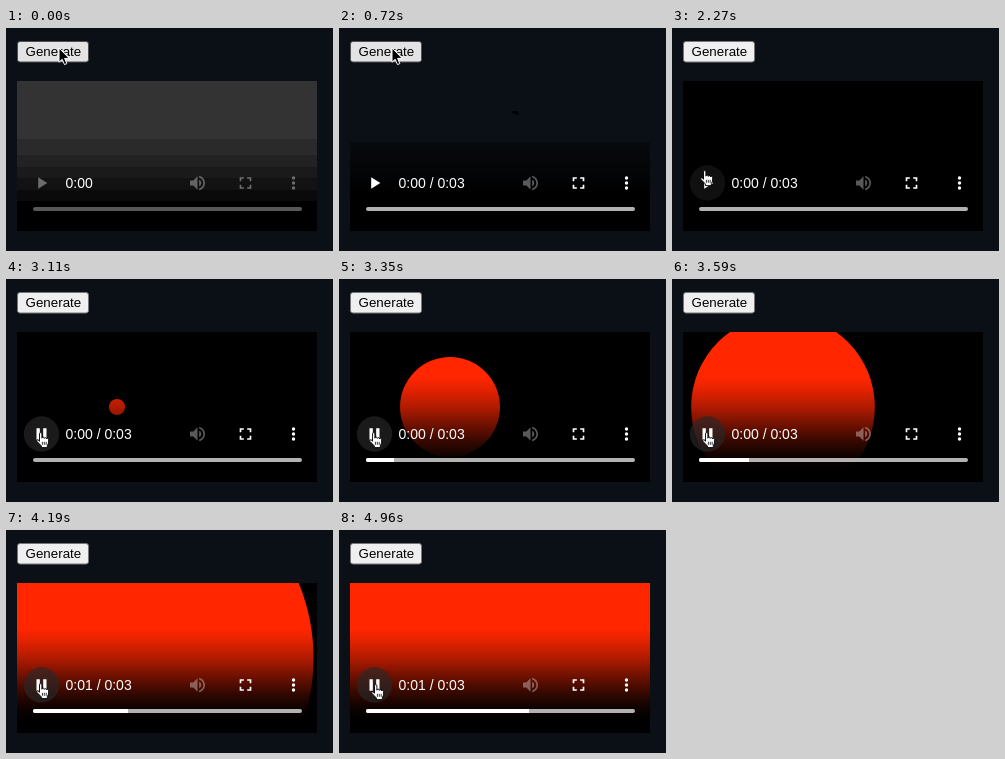
Animation of 327 by 223 pixels, one loop 4.98 s. Source, as an HTML page:

```html
<!DOCTYPE html>
<html lang="en">
<head>
<meta charset="utf-8">
<title>Generate video</title>
<style>
  html, body { margin: 0; width: 100%; height: 100%; overflow: hidden; background: #0b0f16; }
  svg { display: block; width: 327px; height: 223px; font-family: "Liberation Sans", Arial, sans-serif; }

  /* every part shares one clock and changes in hard steps */
  .a { animation: 4.98s step-end infinite; }

  .face { animation-name: face; }
  @keyframes face {
    0% { fill: #e3e3e3; stroke: #4f4f4f; }
    2.409% { fill: #f5f5f5; stroke: #8d8d8d; }
    7.228% { fill: #e3e3e3; stroke: #4f4f4f; }
    34.939%, 100% { fill: #efefef; stroke: #767676; }
  }

  .empty { animation-name: empty; }
  @keyframes empty { 0% { visibility: visible; } 14.457%, 100% { visibility: hidden; } }
  .loading { animation-name: loading; }
  @keyframes loading { 0%, 15.662%, 100% { visibility: hidden; } 14.457% { visibility: visible; } }
  .video { animation-name: video; }
  @keyframes video { 0% { visibility: hidden; } 15.662%, 100% { visibility: visible; } }
  .ready { animation-name: ready; }
  @keyframes ready { 0% { visibility: hidden; } 14.457%, 100% { visibility: visible; } }

  .ball { animation-name: grow; }
  @keyframes grow {
    0% { r: 0px; }
    62.449% { r: 8.1px; animation-timing-function: steps(20); }
    86.546%, 100% { r: 217.5px; }
  }

  .play { animation-name: play; }
  @keyframes play {
    0% { visibility: visible; fill-opacity: .38; }
    14.457% { visibility: visible; fill-opacity: 1; }
    62.449%, 100% { visibility: hidden; fill-opacity: 1; }
  }
  .pause { animation-name: pause; }
  @keyframes pause { 0% { visibility: hidden; } 62.449%, 100% { visibility: visible; } }
  .tools { animation-name: tools; }
  @keyframes tools { 0% { fill-opacity: .38; } 14.457%, 100% { fill-opacity: 1; } }

  .sec0 { animation-name: sec0; }
  @keyframes sec0 { 0%, 82.931%, 100% { visibility: hidden; } 14.457% { visibility: visible; } }
  .sec1 { animation-name: sec1; }
  @keyframes sec1 { 0% { visibility: hidden; } 82.931%, 100% { visibility: visible; } }

  .track { animation-name: track; }
  @keyframes track { 0% { fill: #585858; } 14.457%, 100% { fill: #b2b2b2; } }
  .played { animation-name: played; }
  @keyframes played {
    0% { width: 0; }
    67.269% { width: 28px; }
    72.088% { width: 50px; }
    78.112% { width: 73px; }
    82.931% { width: 95px; }
    88.955% { width: 117px; }
    93.775% { width: 142px; }
    98.594%, 100% { width: 163px; }
  }

  .halo { animation-name: halo; }
  @keyframes halo {
    0% { opacity: 0; }
    45.582% { opacity: .62; }
    46.787% { opacity: .78; }
    47.991% { opacity: .9; }
    49.196%, 100% { opacity: 1; }
  }

  .arrow { animation-name: arrow; }
  @keyframes arrow {
    0% { transform: translate(53px, 20px); visibility: visible; }
    34.939% { transform: translate(48px, 34px); }
    36.144% { transform: translate(45px, 42px); }
    37.349% { transform: translate(43px, 52px); }
    38.554% { transform: translate(41px, 65px); }
    39.759% { transform: translate(39px, 80px); }
    40.963% { transform: translate(37px, 96px); }
    42.168% { transform: translate(36px, 112px); }
    43.373% { transform: translate(35px, 126px); }
    44.377% { transform: translate(34px, 136px); visibility: visible; }
    45.582%, 100% { transform: translate(34px, 136px); visibility: hidden; }
  }
  .hand { animation-name: hand; }
  @keyframes hand {
    0% { transform: translate(28px, 142px); visibility: hidden; }
    45.582% { transform: translate(28px, 142px); visibility: visible; }
    46.787% { transform: translate(29px, 147px); }
    47.991% { transform: translate(29px, 150px); }
    49.196% { transform: translate(30px, 152px); }
    50.401% { transform: translate(30px, 153px); }
    97.389% { transform: translate(31px, 153px); }
    98.594%, 100% { transform: translate(32px, 154px); visibility: visible; }
  }
</style>
</head>
<body>
<svg viewBox="0 0 327 223">
  <defs>
    <clipPath id="screen"><rect x="11" y="53" width="300" height="150"/></clipPath>
    <clipPath id="bar"><rect x="27" y="179" width="269" height="4" rx="2"/></clipPath>
    <linearGradient id="shade" gradientUnits="userSpaceOnUse" x1="0" x2="0" y1="98" y2="190">
      <stop offset="0" stop-opacity="0"/>
      <stop offset=".13" stop-opacity=".1"/>
      <stop offset=".32" stop-opacity=".3"/>
      <stop offset=".51" stop-opacity=".55"/>
      <stop offset=".71" stop-opacity=".8"/>
      <stop offset=".86" stop-opacity=".94"/>
      <stop offset="1"/>
    </linearGradient>
    <linearGradient id="dim" x1="0" x2="0" y1="0" y2="1">
      <stop offset="0" stop-color="#070a0e"/>
      <stop offset=".6" stop-color="#000"/>
    </linearGradient>
  </defs>

  <rect class="a face" x="11.5" y="13.5" width="71" height="20.5" rx="2.5"/>
  <text x="19.6" y="28" font-size="13.333">Generate</text>

  <g class="a empty">
    <path fill="#333" d="M11 53h300v150H11z"/>
    <path fill="#2a2a2a" d="M11 111h300v92H11z"/>
    <path fill="#222" d="M11 127h300v76H11z"/>
    <path fill="#1a1a1a" d="M11 139h300v64H11z"/>
    <path fill="#121212" d="M11 150h300v53H11z"/>
    <path fill="#0a0a0a" d="M11 162h300v41H11z"/>
    <path d="M11 173h300v30H11z"/>
  </g>

  <g class="a loading">
    <rect x="11" y="114" width="300" height="89" fill="url(#dim)"/>
    <path d="M174.5 84.5q2.5-1 4 1.2" fill="none" stroke="#000" stroke-width="2.6" stroke-linecap="round"/>
  </g>

  <g class="a video" clip-path="url(#screen)">
    <path d="M11 53h300v150H11z"/>
    <circle class="a ball" cx="111" cy="128" r="0" fill="#ff2600"/>
    <path fill="url(#shade)" d="M11 98h300v105H11z"/>
  </g>

  <circle class="a halo" cx="35.5" cy="155" r="17.7" fill="#282828" fill-opacity=".65"/>

  <g fill="#fff">
    <g transform="translate(25.5 145) scale(.8333)">
      <path class="a play" d="M8 5v14l11-7z"/>
      <path class="a pause" d="M6 19h4V5H6zM14 5v14h4V5z"/>
    </g>
    <path transform="translate(181.5 145) scale(.8333)" fill-opacity=".35" d="M3 9v6h4l5 5V4L7 9H3zm13.5 3c0-1.77-1.02-3.29-2.5-4.03v8.05c1.48-.73 2.5-2.25 2.5-4.02zM14 3.23v2.06c2.89.86 5 3.54 5 6.71s-2.11 5.85-5 6.71v2.06c4.01-.91 7-4.49 7-8.77s-2.99-7.86-7-8.77z"/>
    <g class="a tools">
      <path transform="translate(229.5 145) scale(.8333)" d="M7 14H5v5h5v-2H7v-3zm-2-4h2V7h3V5H5v5zm12 7h-3v2h5v-5h-2v3zM14 5v2h3v3h2V5h-5z"/>
      <circle cx="287.5" cy="150" r="1.7"/>
      <circle cx="287.5" cy="155" r="1.7"/>
      <circle cx="287.5" cy="160" r="1.7"/>
    </g>
    <g font-size="14">
      <text class="a empty" x="59.5" y="160">0:00</text>
      <text class="a sec0" x="59.5" y="160">0:00 / 0:03</text>
      <text class="a sec1" x="59.5" y="160">0:01 / 0:03</text>
    </g>
    <g clip-path="url(#bar)">
      <rect class="a track" x="27" y="179" width="269" height="4"/>
      <rect class="a played" x="27" y="179" width="0" height="4"/>
    </g>
  </g>

  <path class="a arrow" fill="#000" stroke="#fff" stroke-linejoin="round" d="M0 0V14.2L3.2 11.3L5.5 16.6L7.8 15.6L5.6 10.4H10.2Z"/>
  <g class="a hand" stroke="#000" stroke-linejoin="round">
    <path fill="#fff" stroke-width=".9" d="M3.5 9.2V1.8a1.2 1.2 0 0 1 2.4 0V6.2a1.2 1.2 0 0 1 2.4 .2a1.2 1.2 0 0 1 2.3 .6a1 1 0 0 1 2 .6V11L11.3 13.6V15.6H5.4V14L1 9.4C.2 8.3 1.5 7.2 2.4 8.2Z"/>
    <path fill="none" stroke-width=".8" d="M6.4 9.8v3M8.3 9.8v3M10.2 9.8v3"/>
  </g>
</svg>
</body>
</html>
```
